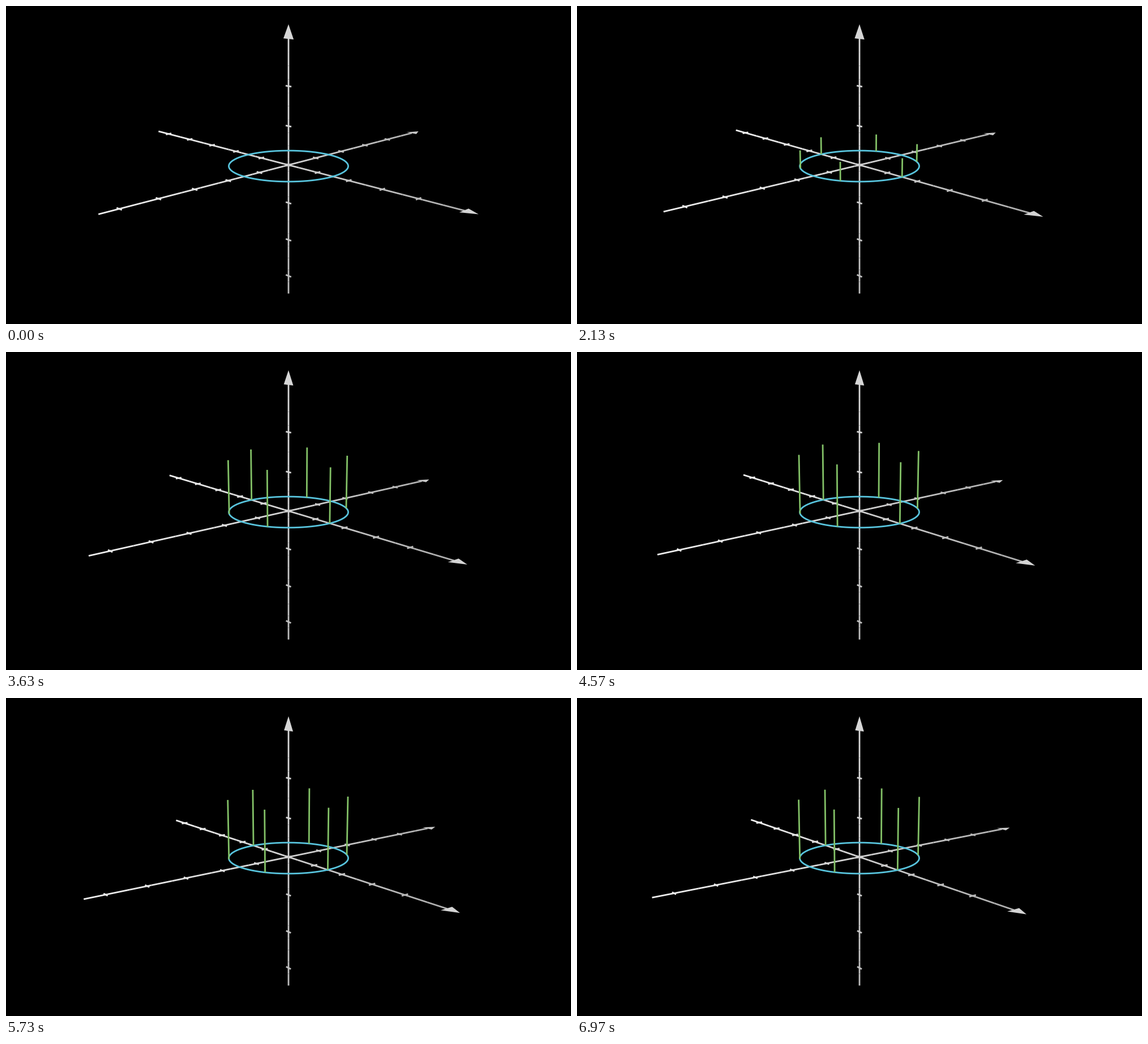
A matplotlib script for the animation above (7010 ms loop, 998 by 561 pixels).

```python
import numpy as np
import matplotlib.pyplot as plt
from matplotlib.animation import FuncAnimation
from matplotlib.collections import LineCollection, PolyCollection

W, H, DPI = 998, 561, 64
FRAMES, LOOP_MS, FPS = 210, 7010, 30
UNIT = H / 8                      # pixels per scene unit
FOCAL = 20
PHI = np.radians(75)
THETA0, SPIN = -np.pi / 4, 0.02   # camera azimuth and its drift, rad/s
STROKE = 0.04 * UNIT * 72 / DPI
LIGHT = np.array([-7.0, -9.0, 10.0])
BLUE, GREEN = "#58C4DD", "#83C167"
RADIUS, HEIGHT, GROW_TIME = 1.5, 1.5, 5.0
TICK, TIP = 0.1, 0.35
X, Y, Z = np.eye(3)


def project(points, theta):
    """Perspective projection of (..., 3) points to stage pixels."""
    c, s = np.cos(theta), np.sin(theta)
    cp, sp = np.cos(PHI), np.sin(PHI)
    points = np.asarray(points, float)
    right = points @ [-s, c, 0]
    up = points @ [-cp * c, -cp * s, sp]
    depth = points @ [sp * c, sp * s, cp]
    scale = UNIT * FOCAL / (FOCAL - depth)
    return np.stack([W / 2 + right * scale, H / 2 - up * scale], axis=-1)


def smooth(u):
    def sig(v):
        return 1 / (1 + np.exp(-v))
    u = np.clip(u, 0, 1)
    edge = sig(-5)
    return np.clip((sig(10 * (u - 0.5)) - edge) / (1 - 2 * edge), 0, 1)


def grey(axis, pos, length):
    """Axis tone: a sheen towards the light plus a little shading."""
    toward = np.sign(LIGHT @ axis)
    sheen = 0.2 * (1 + toward * pos / length) / 2
    ray = LIGHT - pos * axis
    shade = 0.5 * (ray.sum() / np.linalg.norm(ray)) ** 3
    if shade < 0:
        shade *= 0.5
    return (np.clip(0.733 + sheen + shade, 0, 1),) * 3


def build_axis(axis, side, length):
    """Segments, their colours and the arrow tip of one axis."""
    cuts = np.linspace(-length, length - TIP + 0.02, 21)
    segs = [(a * axis, b * axis) for a, b in zip(cuts[:-1], cuts[1:])]
    tones = [grey(axis, m, length) for m in (cuts[:-1] + cuts[1:]) / 2]
    for n in np.arange(-int(length), int(length)):
        segs.append((n * axis - TICK * side, n * axis + TICK * side))
        tones.append(grey(axis, n, length))
    base = (length - TIP) * axis
    tip = [length * axis, base + TIP / 2 * side, base - TIP / 2 * side]
    return segs, tones, tip


segs, tones, tips = [], [], []
for axis, side, length in ((Y, X, 5.5), (X, Y, 5.5), (Z, X, 3.5)):
    s, c, tip = build_axis(axis, side, length)
    segs += s
    tones += c
    tips.append(tip)
segs, tips = np.array(segs), np.array(tips)


def ring(angles):
    return RADIUS * np.stack(
        [np.cos(angles), np.sin(angles), np.zeros_like(angles)], axis=-1)


circle = ring(np.linspace(0, 2 * np.pi, 181))
feet = ring(np.arange(6) * np.pi / 3)

fig = plt.figure(figsize=(W / DPI, H / DPI), dpi=DPI, facecolor="black")
ax = fig.add_axes([0, 0, 1, 1])
ax.set_xlim(0, W)
ax.set_ylim(H, 0)
ax.axis("off")

axis_lines = LineCollection([], colors=tones, linewidths=STROKE, zorder=1)
arrows = PolyCollection([], facecolors=["0.79", "0.83", "0.84"],
                        edgecolors="none", zorder=2)
posts = LineCollection([], colors=GREEN, linewidths=STROKE, zorder=4)
for coll in (axis_lines, arrows, posts):
    coll.set_snap(False)
    ax.add_collection(coll, autolim=False)
loop_line, = ax.plot([], [], color=BLUE, lw=STROKE, zorder=3, snap=False)


def update(i):
    t = i / FPS
    theta = THETA0 + SPIN * t
    axis_lines.set_segments(project(segs, theta))
    arrows.set_verts(project(tips, theta))
    loop_line.set_data(*project(circle, theta).T)
    grown = HEIGHT * smooth(t / GROW_TIME)
    posts.set_segments(
        project(np.stack([feet, feet + grown * Z], axis=1), theta))
    posts.set_visible(grown > 0)
    return axis_lines, arrows, loop_line, posts


anim = FuncAnimation(fig, update, frames=FRAMES, interval=LOOP_MS / FRAMES,
                     repeat=True, repeat_delay=0, blit=False)
plt.show()
```
